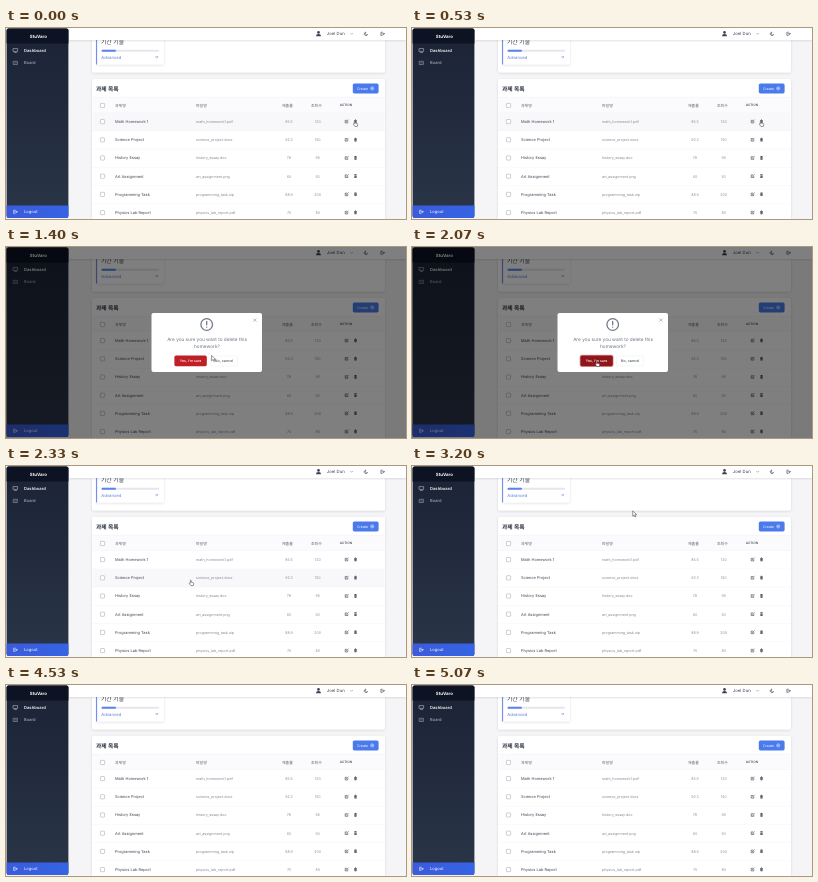
Recreate the animation shown at these times as an HTML page. Size 400 px wide and 191 px high, loop 5.14 s.

```html
<!DOCTYPE html>
<html lang="en">
<head>
<meta charset="utf-8">
<style>
html, body { margin: 0; width: 100%; height: 100%; overflow: hidden; background: #f5f5f7; }
svg { display: block; width: 100%; height: 100%; }
text { font-family: Inter, "Noto Sans CJK KR", "Noto Sans CJK", sans-serif; text-rendering: geometricPrecision; white-space: pre; }
.line { fill: none; stroke-linecap: round; stroke-linejoin: round; }
</style>
</head>
<body>
<svg viewBox="0 0 400 191" preserveAspectRatio="none">
  <defs>
    <linearGradient id="side" x2="0" y2="1">
      <stop stop-color="#1b2335"/><stop offset="1" stop-color="#2a3548"/>
    </linearGradient>
    <linearGradient id="blue"><stop stop-color="#3b5bdb"/><stop offset="1" stop-color="#3564e4"/></linearGradient>
    <filter id="shadow" x="-5%" y="-10%" width="110%" height="125%">
      <feDropShadow dx="0" dy=".8" stdDeviation="1" flood-opacity=".13"/>
    </filter>
    <g id="edit" class="line" stroke="#3b424e" stroke-width=".6">
      <path d="M-.2-1.1H-1.6V1.5H1V.3M-.4.4 1.5-1.5"/>
    </g>
    <g id="trash" fill="#3b424e">
      <path d="M-1.4-1.4H-.5V-1.8H.5V-1.4H1.4V-.9H-1.4ZM-1.2-.6H1.2L1 1.9H-1Z"/>
      <path d="M-.4 0V1.4M.4 0V1.4" stroke="#fff" stroke-width=".25"/>
    </g>
    <g id="exit" class="line" stroke-width=".6">
      <path d="M-.3-1.6H-1.6V1.6H-.3M-.5 0H1.8M.9-.9 1.8 0 .9.9"/>
    </g>
  </defs>
  <rect width="400" height="191" fill="#f5f5f7"/>
  <g id="page"></g>
  <g id="modal">
    <rect width="400" height="191" opacity=".5"/>
    <rect x="145.5" y="66" width="110.5" height="59" rx="2" fill="#fff"/>
    <path class="line" d="M247.6 71.8l2.6 2.6m0-2.6l-2.6 2.6" stroke="#8b92a0" stroke-width=".6"/>
    <circle cx="200.7" cy="77.5" r="5.8" fill="none" stroke="#737a8c" stroke-width="1.3"/>
    <path class="line" d="M200.7 74.4v3.4m0 2.3v.1" stroke="#737a8c" stroke-width="1.3"/>
    <rect id="ring" x="167.6" y="107.8" width="34" height="12.2" rx="2.2" fill="#e3a0a4"/>
    <rect id="yes" x="168.4" y="108.6" width="32.4" height="10.6" rx="1.6"/>
    <rect x="204.5" y="109" width="27" height="10" rx="1.6" fill="#fff" stroke="#e5e7eb" stroke-width=".4"/>
  </g>
  <g id="cursor" stroke="#333" stroke-width=".5" stroke-linejoin="round" fill="#fff">
    <path id="arrow" d="M0 0V5.4L1.3 4.3 2.2 6.2 3 5.8 2.2 3.9H3.9Z"/>
    <path id="hand" d="M-.4.4Q0-.3.5.4V2.3L2.5 2.7Q3.1 2.9 3 3.7L2.6 5.6H.2L-1.4 3.4Q-1.2 2.6-.4 3.2Z"/>
  </g>
</svg>
<script>
const $ = id => document.getElementById(id);
const page = $('page');

function add(parent, name, attrs, content) {
  const el = document.createElementNS('http://www.w3.org/2000/svg', name);
  for (const key in attrs) el.setAttribute(key, attrs[key]);
  if (content) el.textContent = content;
  parent.append(el);
  return el;
}
const rect = (x, y, width, height, fill, more) => add(page, 'rect', { x, y, width, height, fill, ...more });
const text = (x, y, size, fill, content, weight = 400, anchor = 'start', parent = page) =>
  add(parent, 'text', { x, y, fill, 'font-size': size, 'font-weight': weight, 'text-anchor': anchor }, content);
const icon = (name, x, y, stroke) =>
  add(page, 'use', { href: '#' + name, transform: `translate(${x} ${y})`, stroke });
const line = (d, stroke, width = .6) => add(page, 'path', { d, stroke, 'stroke-width': width, class: 'line' });
const box = y => rect(94.4, y - 2.1, 4.2, 4.2, '#fff', { rx: .7, stroke: '#9a9fa9', 'stroke-width': .5 });

// Skill card
rect(86, 5, 293, 39.5, '#fff', { rx: 2, filter: 'url(#shadow)' });
rect(90.5, 5, 67.5, 31.6, '#fff', { rx: 1.5, filter: 'url(#shadow)' });
rect(90.2, 5, .9, 31.6, '#5873e8', { rx: .4 });
text(95, 15.6, 5.8, '#374151', '기간 기술');
rect(95.5, 21.8, 57.5, 2, '#e5e7eb', { rx: 1 });
rect(95.5, 21.8, 14.5, 2, '#5b84ec', { rx: 1 });
text(95.3, 30.8, 4.2, '#5a7bdc', 'Advanced');
line('M149.5 29h2.2m-.8-.8.8.8-.8.8', '#5a7bdc', .45);

// Top bar
rect(63, 0, 337, 12, '#fff', { filter: 'url(#shadow)' });
add(page, 'circle', { cx: 312.5, cy: 4.4, r: 1.3, fill: '#374151' });
add(page, 'path', { d: 'M310 8.3q0-2.2 2.5-2.2t2.5 2.2z', fill: '#374151' });
text(320.8, 7.4, 4.3, '#374151', 'Joel Dun');
line('M344.6 5.3l1 1 1-1', '#6b7280', .5);
line('M361.3 6.9a1.7 1.7 0 1 1-1.3-2.7 1.5 1.5 0 0 0 1.3 2.7', '#374151', .6);
icon('exit', 376.5, 5.8, '#374151');

// Homework table
rect(86, 51, 293, 150, '#fff', { rx: 2, filter: 'url(#shadow)' });
text(90, 63.2, 5.8, '#272e3a', '과제 목록', 700);
rect(346.8, 55.5, 25.8, 9.9, '#4a7aec', { rx: 1.6 });
text(351, 61.7, 3.5, '#fff', 'Create');
add(page, 'circle', { cx: 366.2, cy: 60.4, r: 1.6, fill: 'none', stroke: '#fff', 'stroke-width': .45 });
line('M365.4 60.4h1.6m-.8-.8v1.6', '#fff', .4);
rect(86.5, 69.5, 292, 15.5, '#fbfbfd');
line('M86.5 69.3H378.5M86.5 85H378.5', '#eaecf0', .5);
box(77.5);
[[109, '과제명'], [190, '파일명'], [276, '제출률'], [305, '조회수']]
  .forEach(([x, label]) => text(x, 79.2, 3.9, '#555c68', label, 500));
text(333.7, 78.2, 3.2, '#4b5563', 'ACTION', 600);

const rows = [
  ['Math Homework 1', 'math_homework1.pdf', '85.5', '120'],
  ['Science Project', 'science_project.docx', '92.3', '150'],
  ['History Essay', 'history_essay.doc', '78', '95'],
  ['Art Assignment', 'art_assignment.png', '60', '50'],
  ['Programming Task', 'programming_task.zip', '88.9', '200'],
  ['Physics Lab Report', 'physics_lab_report.pdf', '75', '80']
].map(([name, file, rate, views], i) => {
  const top = 85 + i * 18.2, y = top + 8.6;
  const back = rect(86.5, top, 292, 18.2, '#fff');
  line(`M86.5 ${top + 18.2}H378.5`, '#eaecf0', .5);
  box(y);
  text(109, y + 1.3, 3.95, '#414855', name);
  text(190, y + 1.3, 3.65, '#858b95', file);
  text(283, y + 1.3, 3.65, '#8a909a', rate, 400, 'middle');
  text(311.7, y + 1.3, 3.65, '#8a909a', views, 400, 'middle');
  icon('edit', 340.8, y - .2);
  icon('trash', 349.5, y - .2);
  return { back, top };
});

// Sidebar
rect(.6, .4, 61.8, 189.6, 'url(#side)', { rx: 2 });
add(page, 'path', { d: 'M.6 15.5V2.4q0-2 2-2H60.4q2 0 2 2V15.5Z', fill: '#0d1322' });
text(32.4, 9.8, 4.4, '#fff', 'StuVaro', 700, 'middle');
text(18, 23.9, 4.15, '#f0f2f5', 'Dashboard', 600);
text(18, 36.2, 4.1, '#b9bfc9', 'Board');
line('M7.4 20.6H11.6V23.4H7.4ZM8.5 24.5h2', '#c3c8d1', .55);
line('M7.6 33.3H11.4V36.5H7.6ZM8.7 34.9h1.6', '#a3aab6', .55);
add(page, 'path', { d: 'M.6 177.5H62.4V188q0 2-2 2H2.6q-2 0-2-2Z', fill: 'url(#blue)' });
icon('exit', 9.3, 183.8, '#fff');
text(18, 185.4, 4.1, '#fff', 'Logout');

// Dialog text
const modal = $('modal');
text(201, 94, 4.72, '#6b7280', 'Are you sure you want to delete this', 400, 'middle', modal);
text(201, 101, 4.72, '#6b7280', 'homework?', 400, 'middle', modal);
text(184.6, 115.3, 3.5, '#fff', "Yes, I'm sure", 500, 'middle', modal);
text(218, 115.3, 3.6, '#4b5563', 'No, cancel', 500, 'middle', modal);

// Pointer path: time, x, y
const path = [[0, 348.7, 92.8], [700, 348.7, 92.8], [1080, 248, 97], [1600, 184.7, 114],
  [2800, 184.7, 114], [3340, 228, 31], [3880, 237, 12], [4010, 239, -9], [5140, 239, -9]];

function pointAt(t) {
  const i = path.findIndex((p, k) => k && t <= p[0]);
  const a = path[i - 1], b = path[i];
  const u = (t - a[0]) / (b[0] - a[0]), e = u * u * (3 - 2 * u);
  return [a[1] + (b[1] - a[1]) * e, a[2] + (b[2] - a[2]) * e];
}
const show = (el, on) => el.setAttribute('display', on ? 'inline' : 'none');

function draw(now) {
  const step = 1000 / 15;
  const t = Math.floor((now % 5140 + 4) / step) * step;
  const [x, y] = pointAt(t);
  const open = t > 590 && t < 2320;
  const onYes = open && x > 168 && x < 201 && y > 109 && y < 119;
  const onRow = !open && y > 85;

  show(modal, open);
  show($('ring'), t > 2060);
  $('yes').setAttribute('fill', onYes ? '#8f161b' : '#bf1f26');
  rows.forEach(({ back, top }) =>
    back.setAttribute('fill', onRow && y >= top && y < top + 18.2 ? '#f8f8fa' : '#fff'));

  const hand = onYes || onRow || t < 720;
  show($('hand'), hand);
  show($('arrow'), !hand);
  $('cursor').setAttribute('transform', `translate(${x} ${y})`);
}

const start = performance.now();
function loop() {
  draw(performance.now() - start);
  requestAnimationFrame(loop);
}
loop();
</script>
</body>
</html>
```
